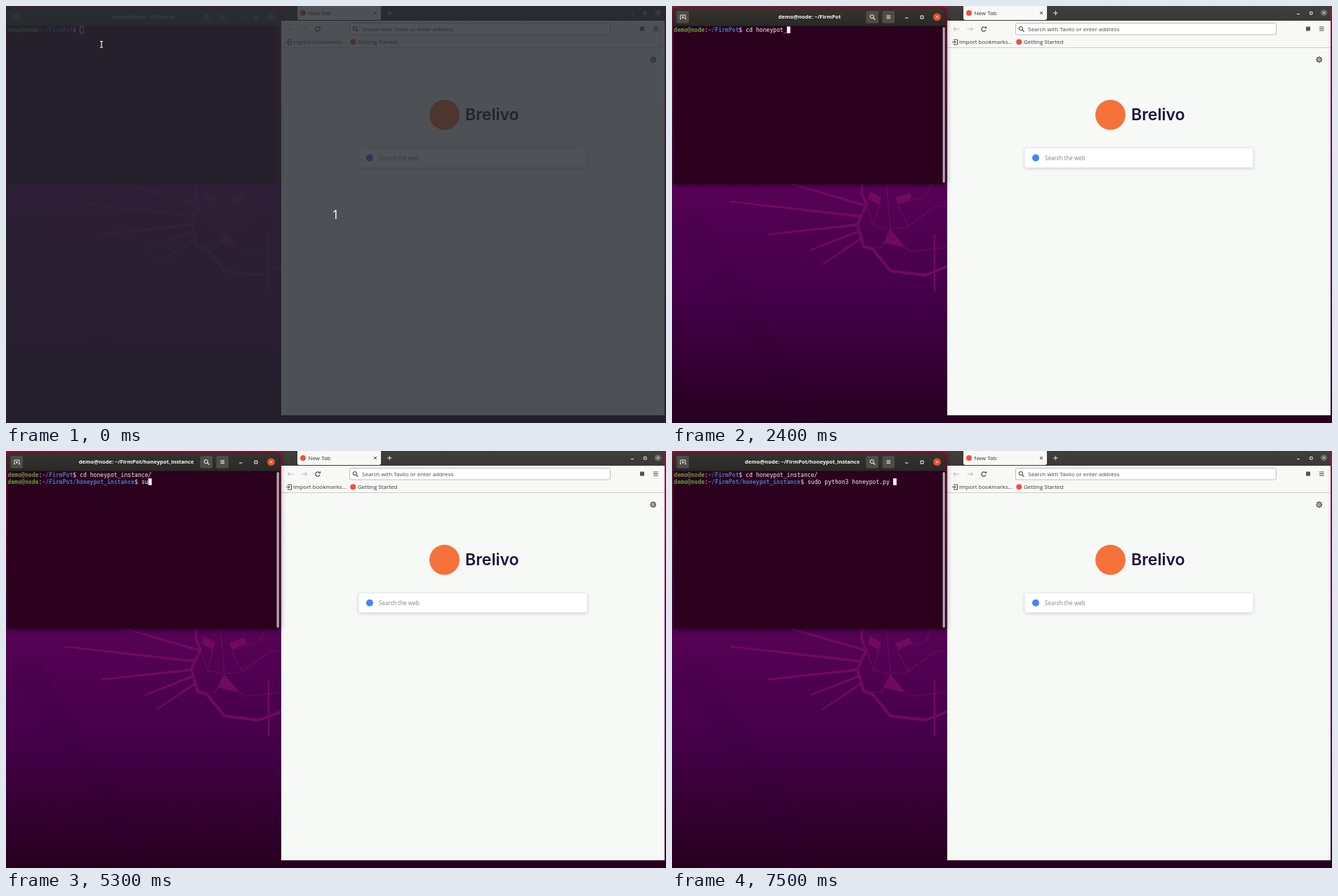
Write an HTML page with a canvas that moves like this. It is 940x595 px and loops after 8 s.

```html
<!DOCTYPE html>
<html lang="en">
<head>
<meta charset="utf-8">
<title>Terminal and browser</title>
<style>
html, body { margin: 0; width: 100%; height: 100%; overflow: hidden; background: #2a0028; }
canvas { display: block; width: 940px; height: 595px; }
</style>
</head>
<body>
<canvas id="stage" width="940" height="595"></canvas>
<script>
const ctx = document.getElementById('stage').getContext('2d');
const LOOP = 8000;
const SANS = '"Open Sans", "Noto Sans", sans-serif';
const MONO = '"DejaVu Sans Mono", "Noto Sans Mono", monospace';
const CELL = 4.88;
const WHO = 'demo@node';
const CMD1 = 'cd honeypot_instance/';
const CMD2 = 'sudo python3 honeypot.py ';
// [time, typed characters]
const KEYS1 = [[1300, 2], [1400, 3], [1600, 4], [1800, 5], [1900, 11], [2400, 12], [3000, 13], [3200, 14], [3300, 21]];
const KEYS2 = [[5200, 1], [5300, 2], [5400, 3], [5700, 5], [5900, 6], [6200, 7], [6300, 8], [6400, 9],
  [6500, 10], [6600, 11], [6800, 12], [7000, 13], [7200, 14], [7300, 15], [7500, 25]];

const typed = (keys, t) => keys.reduce((n, [at, count]) => t >= at ? count : n, 0);

function mix(a, b, k) {
  return `rgb(${a.map((v, i) => Math.round(v + (b[i] - v) * k))})`;
}

function rect(x, y, w, h, fill, r = 0, stroke) {
  ctx.beginPath();
  ctx.roundRect(x, y, w, h, r);
  if (fill) { ctx.fillStyle = fill; ctx.fill(); }
  if (stroke) { ctx.strokeStyle = stroke; ctx.lineWidth = 1; ctx.stroke(); }
}

function disc(x, y, r, fill) {
  ctx.beginPath();
  ctx.arc(x, y, r, 0, Math.PI * 2);
  ctx.fillStyle = fill;
  ctx.fill();
}

function trace(points, close) {
  ctx.beginPath();
  for (let i = 0; i < points.length; i += 2) ctx.lineTo(points[i], points[i + 1]);
  if (close) ctx.closePath();
}

function line(points, color, width = 1) {
  trace(points);
  ctx.strokeStyle = color;
  ctx.lineWidth = width;
  ctx.stroke();
}

function poly(points, fill) {
  trace(points, true);
  ctx.fillStyle = fill;
  ctx.fill();
}

function text(str, x, y, font, color, align = 'left') {
  ctx.font = font;
  ctx.fillStyle = color;
  ctx.textAlign = align;
  ctx.fillText(str, x, y);
}

function fade(y0, y1, ...stops) {
  const g = ctx.createLinearGradient(0, y0, 0, y1);
  stops.forEach(([at, color]) => g.addColorStop(at, color));
  return g;
}

function cross(x, y, r, color, width = 1) {
  line([x - r, y - r, x + r, y + r], color, width);
  line([x + r, y - r, x - r, y + r], color, width);
}

function lens(x, y, r, color) {
  ctx.beginPath();
  ctx.arc(x, y, r, 0, Math.PI * 2);
  ctx.strokeStyle = color;
  ctx.lineWidth = 1;
  ctx.stroke();
  line([x + r * .7, y + r * .7, x + r * 1.8, y + r * 1.8], color, 1.1);
}

function menu(x, y, w, gap, color) {
  for (const d of [-gap, 0, gap]) line([x - w, y + d, x + w, y + d], color, .9);
}

function wallpaper() {
  rect(0, 0, 940, 595, fade(0, 595, [0, '#981638'], [.18, '#7c0b4a'], [.43, '#570256'], [.7, '#440049'], [1, '#27001f']));
  poly([0, 318, 40, 290, 130, 440, 215, 595, 170, 595, 100, 450], 'rgba(40,0,50,.1)');
  const ink = '#6e0a5f';
  ctx.lineJoin = 'round';
  for (const [x, y, tx, ty] of [[83, 279, 268, 300], [137, 326, 266, 312], [198, 348, 267, 321], [214, 369, 269, 332], [160, 251, 274, 284]])
    poly([x, y - 1.3, tx, ty - 2, tx, ty + 2, x, y + 1.3], ink);
  line([271, 250, 270, 267, 277, 284, 264, 311, 273, 343, 286, 347, 311, 378, 361, 384, 394, 371], ink, 4);
  line([374, 326, 374, 407], ink, 2.6);
  line([277, 284, 287, 313, 311, 318, 334, 316, 374, 287, 394, 284], ink, 1.2);
  line([305, 250, 311, 318], ink, 1.2);
  line([295, 283, 287, 313], ink, 1.2);
  line([321, 284, 337, 315], ink, 1.2);
  line([273, 343, 298, 345, 311, 318], ink, 1.2);
  line([333, 345, 341, 350, 394, 344], ink, 1.2);
  line([339, 278, 361, 272, 371, 252], ink, 1.2);
  poly([311, 318, 333, 345, 302, 338], ink);
  poly([282, 264, 298, 273, 295, 284, 279, 275], ink);
  poly([318, 274, 339, 266, 342, 275, 322, 284], ink);
}

function browser() {
  rect(392, 0, 546, 22, fade(0, 22, [0, '#403f3b'], [1, '#393834']));
  rect(415, -4, 119, 24, '#f8f9f7', 3);
  rect(392, 21, 546, 38, '#f8f9f7');
  rect(392, 59, 546, 525, '#f7f9f7');
  rect(392, 59, 546, 1, '#cfcfca');

  const dark = '#33332f', pale = '#b5b5b0', light = '#e8e8e4';
  const label = `8px ${SANS}`;
  disc(423, 10, 4, '#f0503c');
  text('New Tab', 430.5, 13, label, dark);
  cross(526, 10, 2, dark, .9);
  line([543, 10, 549.5, 10], light);
  line([546.3, 6.8, 546.3, 13.2], light);
  line([890, 11.5, 894, 11.5], light);
  rect(908.5, 8.5, 3.5, 3.5, null, 0, light);
  disc(928.5, 9.7, 4.8, '#666560');
  cross(928.5, 9.7, 1.7, light);

  for (const [x, d] of [[405, -1], [424.5, 1]]) {
    line([x - 4 * d, 33, x + 4 * d, 33], pale);
    line([x + d, 30, x + 4 * d, 33, x + d, 36], pale);
  }
  ctx.beginPath();
  ctx.arc(444, 33, 3.2, .3, 5.3);
  ctx.strokeStyle = dark;
  ctx.lineWidth = 1.1;
  ctx.stroke();
  poly([445, 31.8, 448, 31.8, 448, 28.8], dark);

  rect(489.5, 24.5, 371, 16.5, '#fff', 2, '#bcbcb7');
  lens(496.8, 32, 2.6, dark);
  text('Search with Tavilo or enter address', 507, 36, label, '#44443f');
  rect(903, 29.5, 6, 6, '#55554f');
  menu(925.3, 32.5, 3.3, 2.5, dark);

  line([401.5, 49, 401.5, 48, 406.5, 48, 406.5, 55, 401.5, 55, 401.5, 53.5], dark, .9);
  line([399, 51.3, 404, 51.3], dark);
  line([402.4, 49.7, 404, 51.3, 402.4, 53], dark);
  text('Import bookmarks…', 409, 54, label, dark);
  disc(494.3, 51.3, 4, '#f0503c');
  text('Getting Started', 501, 54, label, dark);

  ctx.save();
  ctx.translate(921.7, 76.5);
  for (let i = 0; i < 8; i++) {
    ctx.rotate(Math.PI / 4);
    line([3, 0, 4.4, 0], dark, 1.6);
  }
  ctx.beginPath();
  ctx.arc(0, 0, 3.1, 0, 7);
  ctx.moveTo(1.4, 0);
  ctx.arc(0, 0, 1.4, 0, 7);
  ctx.lineWidth = .9;
  ctx.stroke();
  ctx.restore();

  disc(624.5, 155.3, 21.5, '#f7713a');
  text('Brelivo', 654, 163, '600 23px Inter, sans-serif', '#20123a');

  ctx.save();
  ctx.shadowColor = 'rgba(40,40,60,.25)';
  ctx.shadowBlur = 5;
  ctx.shadowOffsetY = 1;
  rect(502.5, 203, 325, 27.5, '#fff', 3);
  ctx.restore();
  disc(518, 216.7, 5, '#4285f4');
  text('Search the web', 531, 220, `8.1px ${SANS}`, '#84848a');
}

// Draws runs of [string, color, bold] and returns the column after them.
function runs(parts, y) {
  let col = 0;
  for (const [str, color, bold] of parts) {
    text(str, 2.6 + col * CELL, y, `${bold ? 'bold ' : ''}8.1px ${MONO}`, color);
    col += str.length;
  }
  return col;
}

function terminal(t, k) {
  ctx.save();
  ctx.shadowColor = `rgba(0,0,0,${.35 + .3 * k})`;
  ctx.shadowBlur = 5 + 4 * k;
  ctx.shadowOffsetY = 1;
  rect(2, 3, 387.5, 250.5, '#2c001e', [4, 4, 0, 0]);
  ctx.restore();
  rect(2, 28, 387.5, 225.5, mix([51, 2, 38], [43, 1, 30], k));
  rect(2, 3, 387.5, 25.5, fade(3, 28,
    [0, mix([62, 61, 58], [52, 51, 47], k)], [1, mix([57, 56, 53], [41, 41, 38], k)]), [4, 4, 0, 0]);

  const ink = mix([160, 159, 154], [250, 250, 248], k);
  const plate = mix([67, 66, 63], [78, 77, 72], k);
  for (const x of [6.5, 276.5, 299.5]) rect(x, 7, 17.5, 17.5, plate, 2);
  line([12, 18.5, 12, 13, 19, 13, 19, 18.5], ink, .9);
  line([11, 18.5, 13, 18.5], ink, .9);
  line([18, 18.5, 20, 18.5], ink, .9);
  line([15.5, 14.5, 15.5, 18], ink, .9);
  line([13.8, 16.2, 17.2, 16.2], ink, .9);
  lens(284.8, 15, 2.6, ink);
  menu(308.3, 15.7, 2.8, 2, ink);
  line([332, 17, 336.5, 17], ink);
  rect(354, 14, 4, 4, null, 0, ink);
  disc(377.5, 15.7, 5.5, mix([86, 85, 81], [226, 78, 44], k));
  cross(377.5, 15.7, 1.8, ink);

  const moved = t >= 3800;
  text(`${WHO}: ~/FirmPot${moved ? '/honeypot_instance' : ''}`, moved ? 185.6 : 196, 18.3,
    `bold 7.6px ${SANS}`, ink, 'center');

  rect(385.6, 30, 3.2, 222, mix([62, 28, 52], [178, 170, 172], k), 1.6);

  const green = '#5fa33a', blue = '#4a76b8', white = '#f4f2f3';
  const second = t >= 4000;
  let y = 37.2;
  let col = runs([[WHO, green, true], [':', white], ['~/FirmPot', blue, true], ['$ ', white],
    [CMD1.slice(0, typed(KEYS1, t)), white]], y);
  if (second) {
    y += 9.8;
    col = runs([[WHO, green, true], [':', white], ['~/FirmPot/honeypot_instance', blue, true], ['$ ', white],
      [CMD2.slice(0, typed(KEYS2, t)), white]], y);
  }
  const off = (t >= 900 && t < 1300) || (t >= 4400 && t < 5200);
  const x = 2.6 + col * CELL;
  if (t < 400) rect(105.5, 29.5, 4.5, 9.5, null, 0, '#e8e6e7');
  else if (!off) rect(x, y - 7.9, CELL, 9.6, mix([205, 200, 203], [255, 255, 255], k));
}

function pointer() {
  for (const [color, w] of [['#222', 2.4], ['#fff', 1.1]]) {
    line([136, 51, 136, 58.5], color, w);
    line([134, 50.5, 138, 50.5], color, w);
    line([134, 59, 138, 59], color, w);
  }
}

function draw(t) {
  ctx.clearRect(0, 0, 940, 595);
  const focus = t < 500 ? 0 : t < 600 ? .7 : 1;
  wallpaper();
  browser();
  terminal(t, focus);
  if (t < 400) {
    rect(0, 0, 940, 595, 'rgba(36,39,45,.8)');
    text('1', 469.5, 304, `18px ${SANS}`, '#fff', 'center');
  }
  if (t < 1300) pointer();
}

const start = performance.now();
function tick() {
  draw((performance.now() - start) % LOOP);
  requestAnimationFrame(tick);
}
tick();
</script>
</body>
</html>
```
